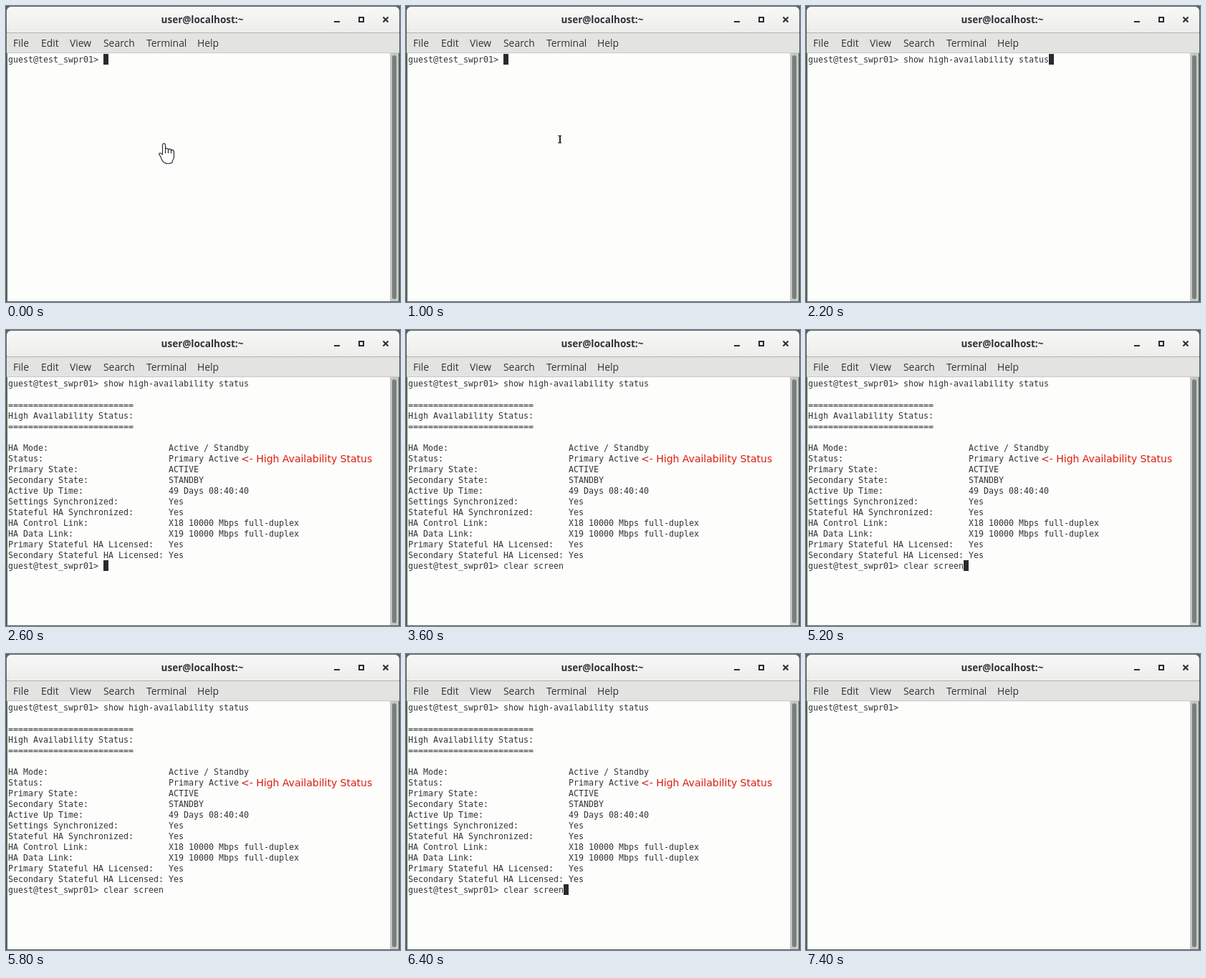
These frames come from a looping animation (550x414 px, 7.6 s). An HTML page with a canvas:

```html
<!DOCTYPE html>
<html lang="en">
<head>
<meta charset="utf-8">
<title>Terminal</title>
<style>
  html, body { margin: 0; width: 100%; height: 100%; overflow: hidden; background: #fdfdfc; }
  canvas { display: block; }
</style>
</head>
<body>
<canvas id="stage" width="550" height="414"></canvas>
<script>
const ctx = document.getElementById('stage').getContext('2d');
const LOOP = 7600, STEP = 200;
const INK = '#303338', DARK = '#272b31', PAPER = '#fdfdfc';
const CELL = 7, LINE = 15, LEFT = 3, TOP = 67;
const MONO = '11.63px "DejaVu Sans Mono", monospace';
const PROMPT = 'guest@test_swpr01> ';
const COMMAND = 'show high-availability status';
const CLEAR = 'clear screen';
const RULE = '='.repeat(25);

const fields = [
  ['HA Mode:', 'Active / Standby'],
  ['Status:', 'Primary Active'],
  ['Primary State:', 'ACTIVE'],
  ['Secondary State:', 'STANDBY'],
  ['Active Up Time:', '49 Days 08:40:40'],
  ['Settings Synchronized:', 'Yes'],
  ['Stateful HA Synchronized:', 'Yes'],
  ['HA Control Link:', 'X18 10000 Mbps full-duplex'],
  ['HA Data Link:', 'X19 10000 Mbps full-duplex'],
  ['Primary Stateful HA Licensed:', 'Yes'],
  ['Secondary Stateful HA Licensed:', 'Yes']
];
const report = ['', RULE, 'High Availability Status:', RULE, '',
  ...fields.map(([label, value]) => label.padEnd(32) + value)];

const menu = [['File', 10], ['Edit', 49], ['View', 89], ['Search', 136], ['Terminal', 196], ['Help', 267]];

// Spans in which the blinking block is hidden.
const hidden = [[200, 800], [3600, 4000], [4600, 5200], [5800, 6400], [7400, LOOP]];

function rect(x, y, w, h, color) {
  ctx.fillStyle = color;
  ctx.fillRect(x, y, w, h);
}

function rounded(x, y, w, h, radius, color) {
  ctx.fillStyle = color;
  ctx.beginPath();
  ctx.roundRect(x, y, w, h, radius);
  ctx.fill();
}

function text(str, x, y, font, color = INK, align = 'left') {
  ctx.font = font;
  ctx.fillStyle = color;
  ctx.textAlign = align;
  ctx.fillText(str, x, y);
}

function drawWindow() {
  rect(0, 0, 550, 414, '#51675a');
  const bar = ctx.createLinearGradient(0, 1, 0, 37);
  bar.addColorStop(0, '#f8f8f8');
  bar.addColorStop(1, '#ededeb');
  rounded(1, 1, 548, 40, 6, bar);
  rect(1, 37, 548, 1, '#b2b5ad');
  rect(1, 38, 548, 27, '#e3e3e1');
  rect(1, 65, 548, 1, '#c8c8c4');
  rect(2, 66, 534, 347, PAPER);

  text('user@localhost:~', 274, 24, 'bold 13.5px "Open Sans", sans-serif', INK, 'center');
  for (const [label, x] of menu) text(label, x, 57, '13.9px "Open Sans", sans-serif');

  rect(458, 21, 8, 2, DARK);
  ctx.strokeStyle = DARK;
  ctx.lineWidth = 2;
  ctx.strokeRect(493, 16, 6, 6);
  ctx.beginPath();
  ctx.moveTo(526.5, 15.5);
  ctx.lineTo(533.5, 22.5);
  ctx.moveTo(533.5, 15.5);
  ctx.lineTo(526.5, 22.5);
  ctx.stroke();

  rect(536, 66, 12, 347, '#c6c7c5');
  rounded(539, 69, 6, 341, 3, '#7c7d80');
}

function drawHand(x, y) {
  ctx.save();
  ctx.translate(x, y);
  ctx.beginPath();
  ctx.moveTo(5.5, 17);
  ctx.lineTo(5.5, 3);
  ctx.quadraticCurveTo(7.5, -1, 9.5, 3);
  ctx.lineTo(9.5, 9);
  ctx.quadraticCurveTo(12, 6.5, 13.5, 10);
  ctx.quadraticCurveTo(16, 7.5, 17.5, 11);
  ctx.quadraticCurveTo(21, 9, 21.5, 13);
  ctx.lineTo(21.5, 20);
  ctx.quadraticCurveTo(21, 24, 19.5, 25);
  ctx.lineTo(19, 28);
  ctx.quadraticCurveTo(13, 31, 8, 28);
  ctx.quadraticCurveTo(4, 25, 3, 20);
  ctx.lineTo(.5, 16);
  ctx.quadraticCurveTo(2, 13, 5.5, 17);
  ctx.fillStyle = '#fff';
  ctx.fill();
  ctx.strokeStyle = DARK;
  ctx.lineWidth = 1.2;
  for (const knuckle of [9.5, 13.5, 17.5]) {
    ctx.moveTo(knuckle, 9);
    ctx.lineTo(knuckle, 15);
  }
  ctx.stroke();
  ctx.restore();
}

function drawBeam(x, y) {
  rect(x - 2, y - 5, 5, 1, DARK);
  rect(x, y - 4, 2, 9, DARK);
  rect(x - 2, y + 5, 5, 1, DARK);
}

function drawPointer(t) {
  if (t < 200) return drawHand(213, 191);
  if (t >= 1400) return;
  const p = Math.min(1, (t - 200) / 800);
  drawBeam(Math.round(221 - 7 * p), Math.round(192 - 6 * p));
}

const typed = (str, t, start) => str.slice(0, Math.max(0, 6 * ((t - start) / STEP + 1)));

function screenLines(t) {
  if (t >= 6800) return [PROMPT];
  if (t < 2400) return [PROMPT + typed(COMMAND, t, 1400)];
  return [PROMPT + COMMAND, ...report, PROMPT + typed(CLEAR, t, 2800)];
}

function draw(t) {
  drawWindow();
  const lines = screenLines(t);
  lines.forEach((line, i) => text(line, LEFT, TOP + 12 + i * LINE, MONO));
  if (lines.length > 1) {
    text('<- High Availability Status', 328, 185, '14px "DejaVu Sans", sans-serif', '#dc1c10');
  }
  if (!hidden.some(([from, to]) => t >= from && t < to)) {
    const last = lines.length - 1;
    rect(LEFT + lines[last].length * CELL, TOP + last * LINE, CELL, LINE, DARK);
  }
  drawPointer(t);
}

function tick() {
  const t = performance.now() % LOOP;
  draw(Math.floor(t / STEP) * STEP);
  requestAnimationFrame(tick);
}
tick();
</script>
</body>
</html>
```
